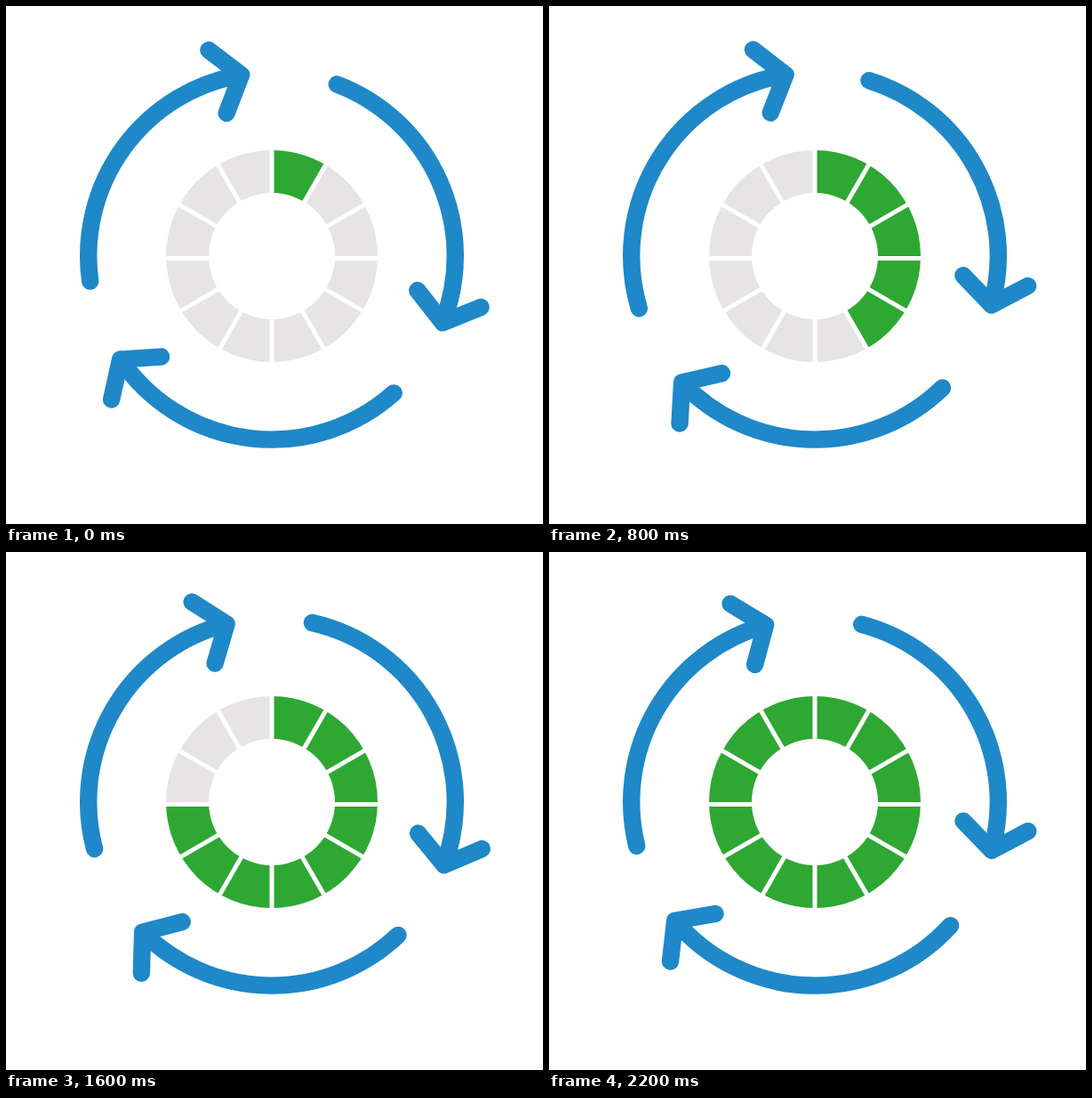
These frames come from a looping animation (604 px wide and 582 px high, 2.4 s). An HTML page:

```html
<!DOCTYPE html>
<html lang="en">
<head>
<meta charset="utf-8">
<title>Progress ring</title>
<style>
  html, body { margin: 0; width: 100%; height: 100%; overflow: hidden; background: #fff; }
  svg { display: block; width: 100%; height: 100%; }
  #arrows path {
    fill: none; stroke: #1e88c9; stroke-width: 19.4;
    stroke-linecap: round; stroke-linejoin: round;
  }
  #spokes path { stroke: #fff; stroke-width: 5; }
</style>
</head>
<body>
<svg viewBox="0 0 604 582">
  <clipPath id="ring">
    <path clip-rule="evenodd" d="M180 281a119 119 0 1 0 238 0a119 119 0 1 0-238 0z
      M228 281a71 71 0 1 0 142 0a71 71 0 1 0-142 0z"/>
  </clipPath>
  <g id="wedges" clip-path="url(#ring)"></g>
  <g id="spokes"></g>
  <g id="arrows"></g>
</svg>
<script>
const STEP = 200;
const COUNT = 12;
const CENTER = [299, 280.8];
const HUB = [299, 283.4];
const RADIUS = 206.3;
const GREEN = '#2ea832';
const GREY = '#e6e4e5';

// Rotation of the arrows at each step, in degrees
const TURNS = [0, 25.7, 57, 85.7, 115.1, 147.4, 174.2, 206.6, 234.4, 263, 294.3, 354];

// Tip angle (clockwise from the top) and sweep of each arrow
const ARROWS = [[350.4, 88.3], [111.3, 90.5], [235.7, 97.4]];

// Point at a clockwise angle from the top
function polar([cx, cy], radius, degrees) {
  const a = degrees * Math.PI / 180;
  return `${(cx + radius * Math.sin(a)).toFixed(3)} ${(cy - radius * Math.cos(a)).toFixed(3)}`;
}

function addPath(parentId, d) {
  const path = document.createElementNS('http://www.w3.org/2000/svg', 'path');
  path.setAttribute('d', d);
  document.getElementById(parentId).appendChild(path);
  return path;
}

function arrowPath(tip, sweep) {
  const at = (radius, offset) => polar(CENTER, radius, tip + offset);
  const end = at(RADIUS, 0);
  return `M${at(RADIUS, -sweep)}A${RADIUS} ${RADIUS} 0 0 1 ${end}` +
    `M${at(242, -7.5)}L${end}L${at(168.3, -8)}`;
}

const wedges = Array.from({ length: COUNT }, (_, i) =>
  addPath('wedges', `M${HUB}L${polar(HUB, 160, i * 30)}L${polar(HUB, 160, i * 30 + 30)}z`));

for (let i = 0; i < COUNT; i++) addPath('spokes', `M${HUB}L${polar(HUB, 130, i * 30)}`);

const arrows = ARROWS.map(([tip, sweep]) => addPath('arrows', arrowPath(tip, sweep)));

function draw(time) {
  const step = Math.floor(time / STEP) % COUNT;
  wedges.forEach((wedge, i) => wedge.setAttribute('fill', i <= step ? GREEN : GREY));
  arrows.forEach(arrow =>
    arrow.setAttribute('transform', `rotate(${TURNS[step]} ${CENTER})`));
}

const start = performance.now();
function tick() {
  draw(performance.now() - start);
  requestAnimationFrame(tick);
}
tick();
</script>
</body>
</html>
```
